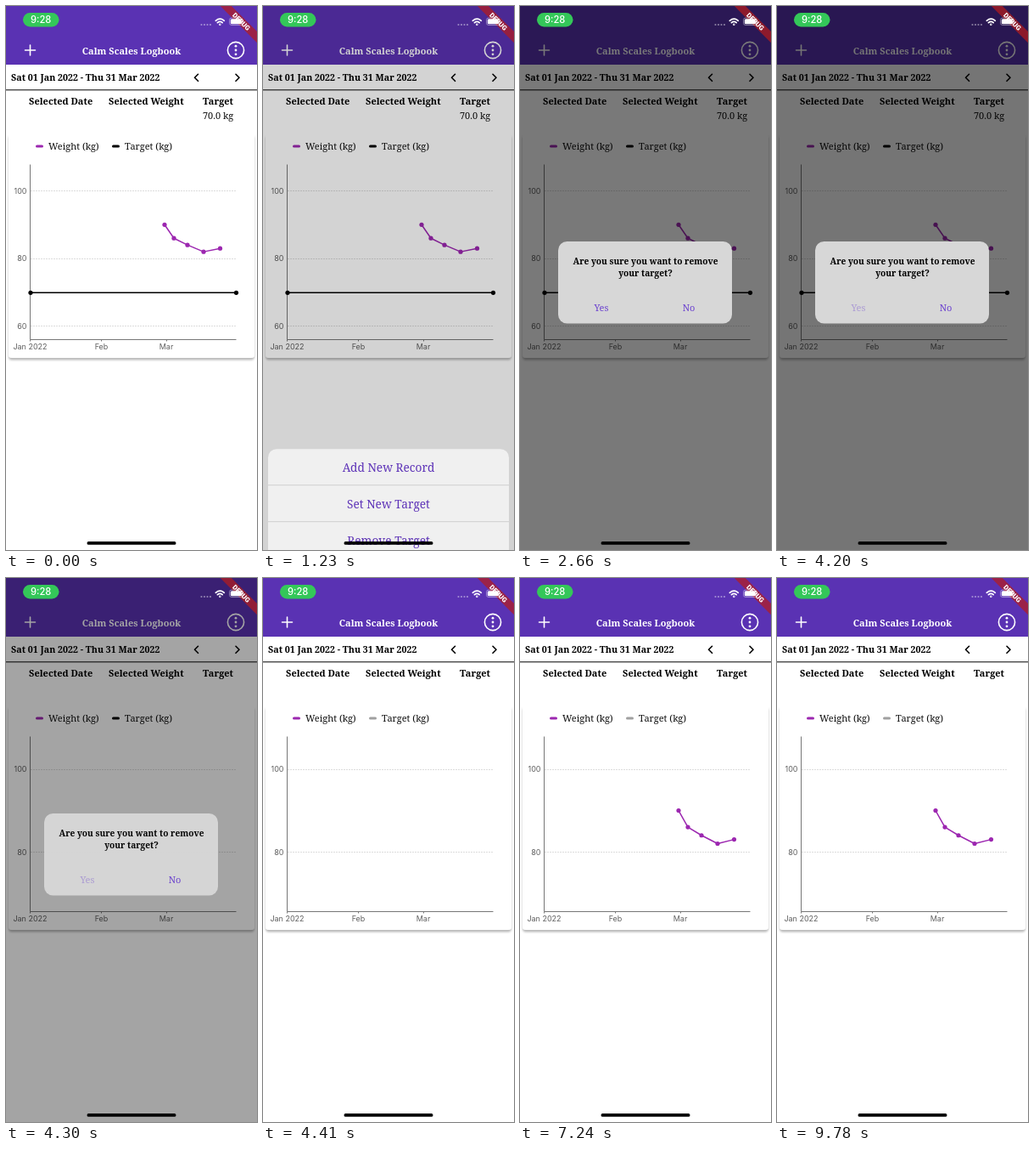
These frames come from a looping animation (296x640 px, 9.82 s). An HTML page:

```html
<!DOCTYPE html>
<html lang="en">
<head>
<meta charset="utf-8">
<title>Weight chart</title>
<style>
  html, body { margin: 0; width: 100%; height: 100%; overflow: hidden; background: #fff; }
  svg { display: block; width: 296px; height: 640px; }
  text { font: 11px "Noto Serif", serif; fill: #111; }
  .bold { font-weight: 700; font-size: 10.7px; fill: #000; }
  .column .bold { font-size: 11px; }
  .axis text { font: 9px Inter, sans-serif; fill: #606060; }
  .mid { text-anchor: middle; }
  .end { text-anchor: end; }
  .line { fill: none; stroke-linecap: round; stroke-linejoin: round; }
  .sheet text { font-size: 13.7px; fill: #5f35b8; }
  .dialog .bold { font-size: 10.2px; }
  .dialog .action { fill: #6a40cf; }
  .banner { font: 900 8px Roboto, sans-serif; fill: #fff; }
  .clock { font: 500 11.2px Inter, sans-serif; fill: #fff; }
</style>
</head>
<body>
<svg viewBox="0 0 296 640">
  <defs>
    <filter id="shadow" x="-5%" y="-5%" width="110%" height="112%">
      <feDropShadow dx="0" dy="2.5" stdDeviation="1.3" flood-opacity=".27"/>
    </filter>
    <clipPath id="reveal"><rect id="revealRect" x="29" y="180" height="215"/></clipPath>
    <clipPath id="below"><rect y="152" width="296" height="273"/></clipPath>
  </defs>
  <rect width="296" height="640" fill="#fff"/>

  <rect width="296" height="69" fill="#5a32b3"/>
  <path class="line" d="M22.5 52h12M28.5 46v12" stroke="#fff" stroke-width="1.6"/>
  <text class="bold mid" x="148" y="56.5" style="fill:#fff;font-size:11px">Calm Scales Logbook</text>
  <circle cx="271" cy="52" r="9.6" fill="none" stroke="#fff" stroke-width="1.6"/>
  <g fill="#fff">
    <circle cx="271" cy="47.2" r="1.4"/><circle cx="271" cy="52" r="1.4"/><circle cx="271" cy="56.8" r="1.4"/>
  </g>

  <text class="bold" x="6" y="88">Sat 01 Jan 2022 - Thu 31 Mar 2022</text>
  <path class="line" d="M226.5 80.3l-4 4 4 4M271 80.3l4 4-4 4" stroke="#000" stroke-width="1.6"/>
  <path d="M0 98.8h296" stroke="#000"/>
  <g class="column">
    <text class="bold" x="27" y="116">Selected Date</text>
    <text class="bold" x="121" y="116">Selected Weight</text>
    <text class="bold mid" x="250" y="116">Target</text>
    <text class="mid" id="targetValue" x="250" y="133">70.0 kg</text>
  </g>

  <g clip-path="url(#below)">
    <rect x="3" y="150" width="290" height="264" rx="4" fill="#fff" filter="url(#shadow)"/>
  </g>
  <path class="line" d="M36.5 165h6" stroke="#9c27b0" stroke-width="3"/>
  <text x="50" y="169">Weight (kg)</text>
  <path class="line" id="targetKey" d="M126.5 165h6" stroke-width="3"/>
  <text x="140" y="169">Target (kg)</text>

  <g class="axis">
    <g id="grid"></g>
    <path d="M28.5 186.5V392.5H271.5M112.5 392.5v2M189.5 392.5v2M28.5 392.5v2" fill="none" stroke="#777"/>
    <text class="mid" x="28.5" y="403.5">Jan 2022</text>
    <text class="mid" x="112.5" y="403.5">Feb</text>
    <text class="mid" x="189" y="403.5">Mar</text>
  </g>
  <g id="target">
    <path d="M29 337.3h242" stroke="#000" stroke-width="1.6"/>
    <circle cx="29" cy="337.3" r="2.6"/><circle cx="271.5" cy="337.3" r="2.6"/>
  </g>
  <polyline class="line" id="weights" stroke="#9c27b0" stroke-width="1.5" clip-path="url(#reveal)"/>
  <g id="markers" fill="#9c27b0"></g>

  <rect id="barrier" width="296" height="640"/>

  <g class="sheet mid" id="sheet">
    <rect x="6" width="284" height="130" rx="10" fill="#f0f0f0"/>
    <path d="M6 42.5h284M6 85.5h284" stroke="#cfcfcf"/>
    <text x="148" y="26.5">Add New Record</text>
    <text x="148" y="69.5">Set New Target</text>
    <text x="148" y="112.5">Remove Target</text>
  </g>

  <g class="dialog mid" id="dialog">
    <rect x="45" y="277" width="205" height="96.5" rx="10.5" fill="#d7d7d7"/>
    <text class="bold" x="148" y="303.5">Are you sure you want to remove</text>
    <text class="bold" x="148" y="318">your target?</text>
    <text class="action" id="yes" x="96" y="359">Yes</text>
    <text class="action" x="199" y="359">No</text>
  </g>

  <g transform="translate(296 0) rotate(45)">
    <rect x="-32" y="21.3" width="64" height="9.2" fill="#b71c1c" fill-opacity=".7"/>
    <text class="banner mid" y="28.8">DEBUG</text>
  </g>
  <rect x="20" y="8" width="42.5" height="16.5" rx="8.25" fill="#34c759"/>
  <text class="clock mid" x="41.2" y="20.3">9:28</text>
  <g fill="#fff" fill-opacity=".45">
    <circle cx="230.5" cy="22" r="1.1"/><circle cx="234" cy="22" r="1.1"/>
    <circle cx="237.5" cy="22" r="1.1"/><circle cx="241" cy="22" r="1.1"/>
  </g>
  <g class="line" stroke="#fff" stroke-width="1.7">
    <path d="M247.3 17.3q5-4.4 10 0M249.4 19.6q2.9-2.5 5.8 0"/>
    <circle cx="252.3" cy="21.7" r=".4"/>
  </g>
  <rect x="263.5" y="14" width="15.5" height="8.5" rx="2.5" fill="none" stroke="#fff" stroke-opacity=".5" stroke-width=".8"/>
  <rect x="264.8" y="15.3" width="12.9" height="5.9" rx="1.5" fill="#fff"/>
  <rect x="95.5" y="630" width="105" height="3.8" rx="1.9" fill="#000"/>
</svg>
<script>
const LOOP = 9820;
const SHEET_IN = 1114, SHEET_OUT = 2330;
const DIALOG_IN = 2515, YES_TAP = 4190, DIALOG_OUT = 4250, FADE = 150;
const REDRAW = 4400, REDRAW_MS = 1500;
const SHEET_TOP = 476;
const points = [[187, 90], [198, 86], [214, 84], [233, 82], [252.5, 83]];

const $ = id => document.getElementById(id);
const set = (id, attrs) => {
  for (const key in attrs) $(id).setAttribute(key, attrs[key]);
};
const progress = (t, start, length) => Math.min(1, Math.max(0, (t - start) / length));
const easeOut = p => 1 - (1 - p) ** 3;

function layoutChart(hasTarget) {
  const y = v => hasTarget ? 217.5 + (100 - v) * 3.98 : 225 + (100 - v) * 4.86;
  const ticks = hasTarget ? [100, 80, 60] : [100, 80];
  $('grid').innerHTML = ticks.map(v => `
    <path d="M29 ${Math.floor(y(v)) + .5}h242" stroke="#dcdcdc" stroke-dasharray="2 1"/>
    <text class="end" x="24.5" y="${y(v) + 3.3}">${v}</text>`).join('');
  set('weights', { points: points.map(([x, v]) => `${x},${y(v)}`).join(' ') });
  $('markers').innerHTML = points.map(([x, v]) =>
    `<circle cx="${x}" cy="${y(v)}" r="2.6"/>`).join('');
  const visibility = hasTarget ? 'visible' : 'hidden';
  set('target', { visibility });
  set('targetValue', { visibility });
}

let shownTarget = null;

function draw(t) {
  const hasTarget = t < DIALOG_OUT;
  if (hasTarget !== shownTarget) layoutChart(shownTarget = hasTarget);
  set('targetKey', { stroke: t < REDRAW ? '#000' : '#a0a0a0' });

  // The line is wiped in from the left, then its markers appear.
  const redraw = progress(t, REDRAW, REDRAW_MS);
  const wipe = hasTarget ? 1 : progress(redraw, .1, .7);
  set('revealRect', { width: 245 * wipe });
  set('markers', { opacity: hasTarget ? 1 : easeOut(progress(redraw, .85, .15)) });

  const opened = progress(t, SHEET_IN, 335), closed = progress(t, SHEET_OUT, 280);
  const raised = easeOut(opened) * (1 - closed ** 2);
  set('sheet', {
    transform: `translate(0 ${640 - (640 - SHEET_TOP) * raised})`,
    visibility: raised > 0 ? 'visible' : 'hidden'
  });

  const dialog = progress(t, DIALOG_IN, FADE) * (1 - progress(t, DIALOG_OUT, FADE));
  set('dialog', { opacity: easeOut(dialog) });
  set('yes', { opacity: t < YES_TAP ? 1 : .4 });

  const sheetShade = .2 * easeOut(progress(t, SHEET_IN, 240)) * (1 - closed);
  const dialogShade = .54 * dialog;
  set('barrier', { opacity: 1 - (1 - sheetShade) * (1 - dialogShade) });
}

const start = performance.now();
function frame() {
  draw((performance.now() - start) % LOOP);
  requestAnimationFrame(frame);
}
frame();
</script>
</body>
</html>
```
